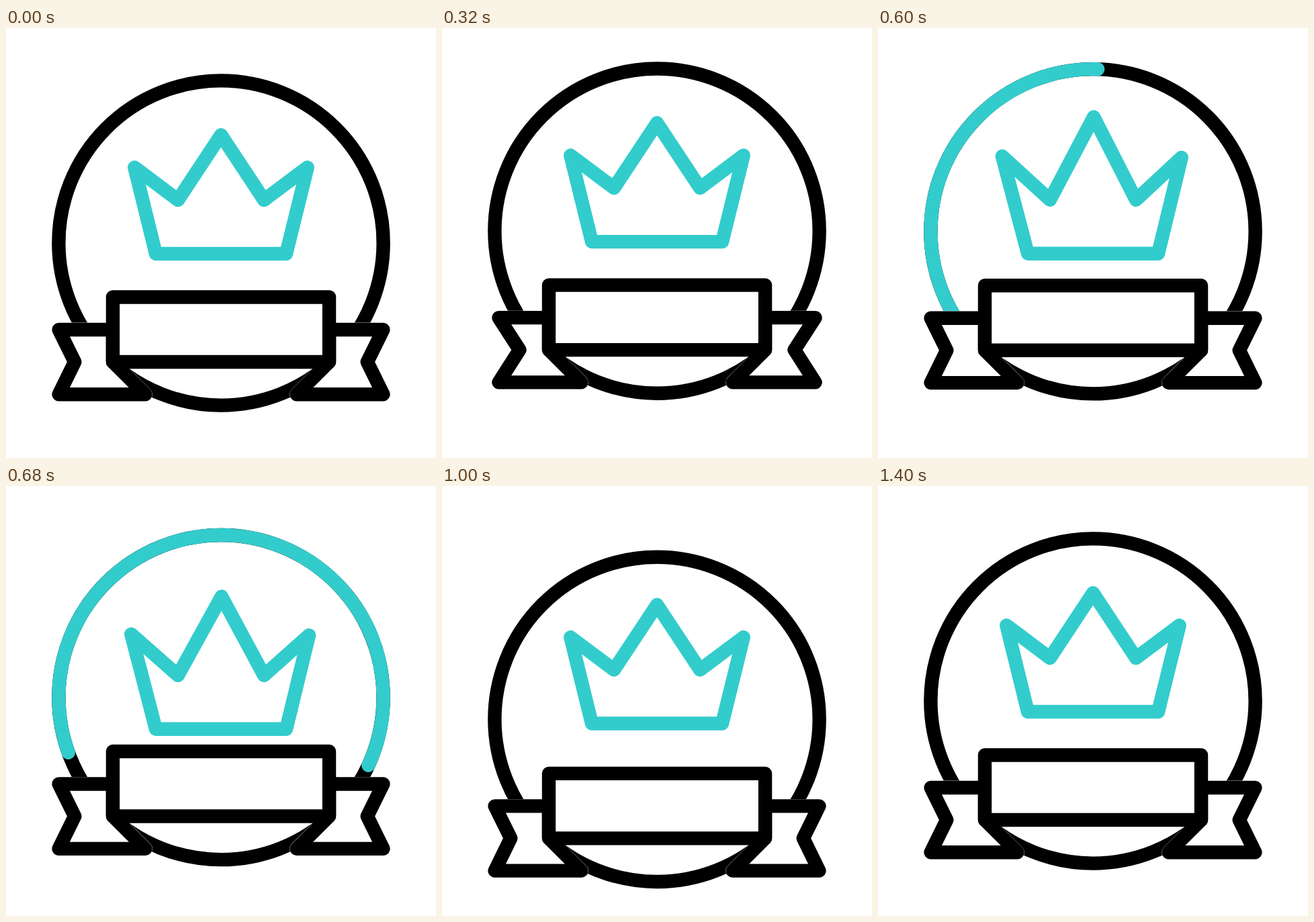
An HTML page that plays this animation: 640 by 640 pixels, repeating every 1.48 s.

```html
<!DOCTYPE html>
<html lang="en">
<head>
<meta charset="utf-8">
<title>Crown badge</title>
<style>
  html, body { margin: 0; width: 100%; height: 100%; overflow: hidden; background: #fff; }
  svg { display: block; width: 100%; height: 100%; }
  svg * { stroke-width: 20.4; stroke-linejoin: round; stroke-linecap: round; }
  .ink { stroke: #000; fill: #fff; }
  .teal { stroke: #3cc; fill: none; }
  .halo { stroke: #fff; stroke-width: 20.9; fill: #fff; }
</style>
</head>
<body>
<svg viewBox="0 0 640 640">
  <g id="badge">
    <circle class="ink" cx="320" cy="320" r="241.6"/>
    <circle class="teal" id="sweep" cx="320" cy="320" r="241.6" pathLength="360" transform="rotate(140 320 320)"/>
    <path class="teal" id="crown"/>
    <path class="halo ribbon"/>
    <path class="ink ribbon"/>
    <g transform="matrix(-1 0 0 1 640 0)">
      <path class="halo ribbon"/>
      <path class="ink ribbon"/>
    </g>
    <path class="ink" d="M159 400.5H481V497H159Z"/>
  </g>
</svg>
<script>
const LOOP = 1480;
const $ = id => document.getElementById(id);
const ribbons = document.querySelectorAll('.ribbon');

const progress = (t, from, to) => Math.min(1, Math.max(0, (t - from) / (to - from)));

function ease(t, from, to) {
  const u = progress(t, from, to);
  return u * u * (3 - 2 * u);
}

// The badge rises, drops below its place and returns.
const bob = t => -25.6 * ease(t, 40, 480) + 53.6 * ease(t, 480, 960) - 28 * ease(t, 960, 1400);

// The crown hops inside the badge.
const hop = t => 10 * (ease(t, 986, 1150) - ease(t, 320, 430))
               + 44 * (ease(t, 430, 725) - ease(t, 725, 986));

// One damped swing of the ribbon ends, first outwards.
function sway(t, damping) {
  const u = progress(t, 40, 480);
  return -53 * Math.sin(2 * Math.PI * u) * (1 - u) ** damping;
}

const sweepAngle = t => 360 * ease(t, 446, 822);

function drawCrown(t) {
  const flare = ease(t, 430, 600) - ease(t, 600, 860);
  const point = (x, y, dx = 0, dy = 0) => `${x + dx * flare} ${y + dy * flare}`;
  const left = point(191.3, 207.5, -6.5, -16.5);
  const tip = point(320, 159.2, 1, -26.5);
  const right = point(448.7, 207.5, 3, -14.5);
  $('crown').setAttribute('d', `M223 336L${left}L256 256L${tip}L384 256L${right}L417 336Z`);
  $('crown').setAttribute('transform', `translate(0 ${hop(t)})`);
}

function drawRibbons(t) {
  const end = 78.6 + sway(t, 1.9);
  const notch = 102.3 + sway(t, 1.1);
  const d = `M159 449H${end}L${notch} 497L${end} 545.3H207.5L159 497Z`;
  ribbons.forEach(ribbon => ribbon.setAttribute('d', d));
}

function drawSweep(t) {
  const tail = sweepAngle(t - 180);
  const length = sweepAngle(t) - tail;
  const { style } = $('sweep');
  style.visibility = length > 0.5 ? 'visible' : 'hidden';
  style.strokeDasharray = `${length} 720`;
  style.strokeDashoffset = -tail;
}

function draw(t) {
  $('badge').setAttribute('transform', `translate(0 ${bob(t)})`);
  drawCrown(t);
  drawRibbons(t);
  drawSweep(t);
}

let start;
function tick(now) {
  start ??= now;
  draw((now - start) % LOOP);
  requestAnimationFrame(tick);
}
draw(0);
requestAnimationFrame(tick);
</script>
</body>
</html>
```
